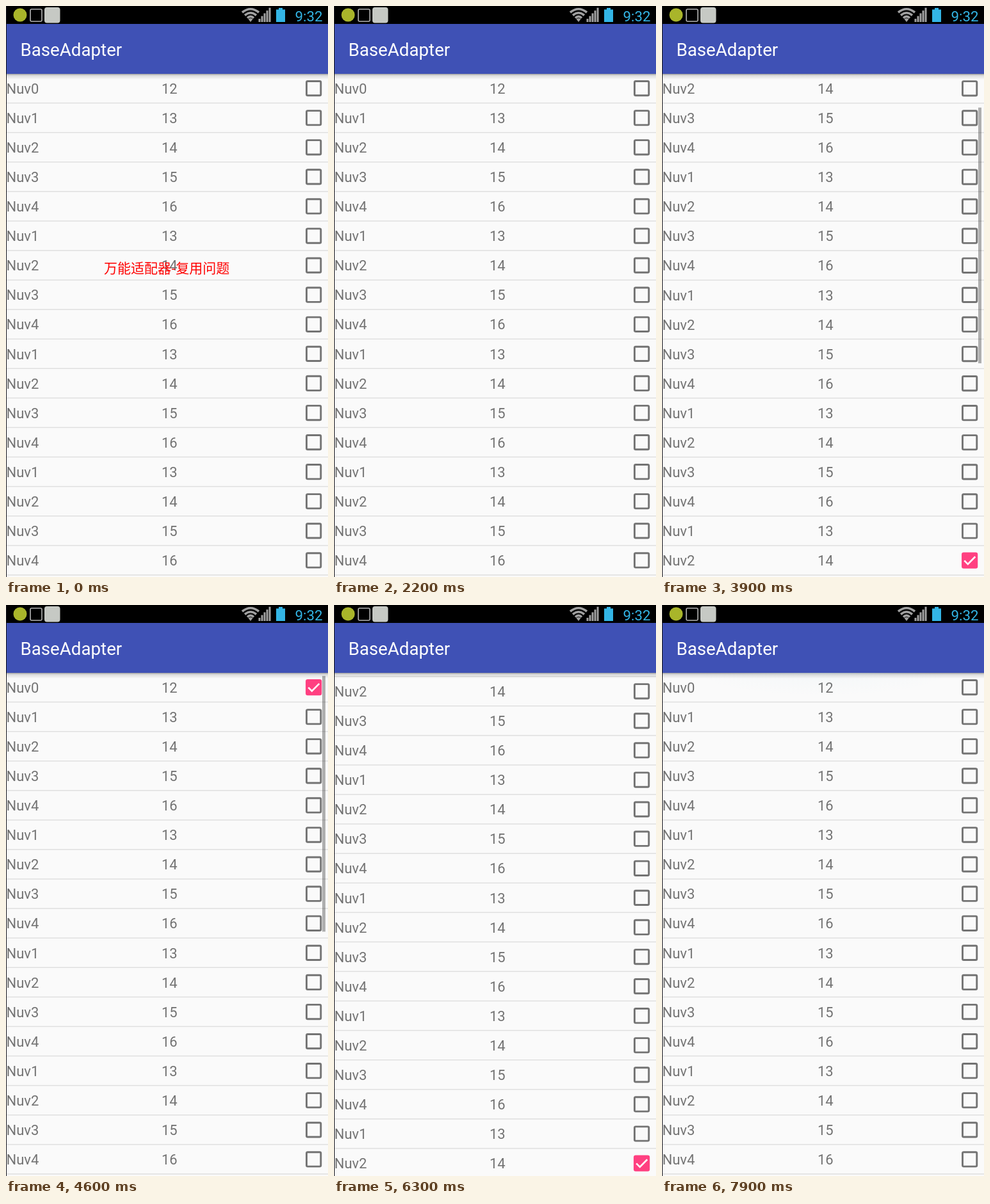
An HTML page for the animation above (8000 ms loop, 503 by 892 pixels).

```html
<!DOCTYPE html>
<html lang="en">
<head>
<meta charset="utf-8">
<title>BaseAdapter</title>
<style>
  html, body { margin: 0; width: 100%; height: 100%; overflow: hidden; background: #fafafa; }
  svg { display: block; width: 503px; height: 892px; }
  text { font-family: Roboto, "Noto Sans", sans-serif; }
  .row text { font-size: 22px; fill: rgba(0, 0, 0, .54); }
  .caption { font: 300 21px "Noto Sans CJK SC", "Noto Sans CJK", sans-serif; fill: #f00; }
</style>
</head>
<body>
<svg viewBox="0 0 503 892">
  <defs>
    <linearGradient id="shade" x2="0" y2="1">
      <stop offset="0" stop-color="#000" stop-opacity=".36"/>
      <stop offset=".3" stop-color="#000" stop-opacity=".12"/>
      <stop offset="1" stop-color="#000" stop-opacity="0"/>
    </linearGradient>
    <radialGradient id="halo">
      <stop offset="0" stop-color="#4fb3d9"/>
      <stop offset="1" stop-color="#4fb3d9" stop-opacity="0"/>
    </radialGradient>
    <radialGradient id="rim">
      <stop offset="0" stop-color="#d8f0f6"/>
      <stop offset="1" stop-color="#d8f0f6" stop-opacity="0"/>
    </radialGradient>
  </defs>
  <rect width="503" height="892" fill="#fafafa"/>
  <g id="list"></g>
  <ellipse id="glow" cx="252" cy="106" rx="200" ry="36" fill="url(#halo)"/>
  <rect id="thumb" x="494" width="5" height="399.5" fill="#000" fill-opacity=".3"/>
  <rect y="106" width="503" height="9" fill="url(#shade)"/>
  <ellipse id="edge" cx="253" cy="106" rx="170" ry="3" fill="url(#rim)"/>

  <rect y="28" width="503" height="78" fill="#3f51b5"/>
  <text x="22.5" y="78" font-size="27.7" fill="#fff">BaseAdapter</text>

  <rect width="503" height="28" fill="#000"/>
  <circle cx="22" cy="14" r="10.5" fill="#a9b52a"/>
  <rect x="38" y="5" width="18" height="19" rx="2" fill="none" stroke="#b4b4b4" stroke-width="1.6"/>
  <rect x="60" y="2" width="24.5" height="24.5" rx="4" fill="#c6c9c4"/>
  <g fill="none" stroke="#a0a0a0" stroke-width="3.6">
    <path d="M369 10Q382 -.5 395 10"/>
    <path d="M373 14.500Q382 7 391 14.500"/>
    <path d="M377 18.700Q382 14 387 18.700"/>
  </g>
  <path d="M378.500 20.500Q382 18 385.500 20.500L382 25Z" fill="#a0a0a0"/>
  <g id="bars" fill="#a0a0a0"></g>
  <path d="M426 3h6v2.500h4V25h-14V5.500h4Z" fill="#33b5e5"/>
  <text x="451.5" y="24" font-size="22.3" fill="#33b5e5">9:32</text>

  <text id="caption" class="caption" x="153" y="417">万能适配器-复用问题</text>
  <rect width="1" height="892" fill="#15151c"/>
</svg>
<script>
const LOOP = 8000, STEP = 100, TOP = 105.5, PITCH = 46.08, COUNT = 33;
const $ = id => document.getElementById(id);
const clamp = x => Math.min(1, Math.max(0, x));
const easeOut = p => 1 - (1 - p) ** 1.35;

// Each drag scrolls over [start, end], then its scrollbar fades over [fade, gone].
const drags = [
  { start: 3600, end: 3900, from: 0, to: 92, fade: 4200, gone: 4200 },
  { start: 4200, end: 4600, from: 92, to: 0, fade: 4800, gone: 5100 },
  { start: 5500, end: 5800, from: 0, to: 86, fade: 6100, gone: 6300 },
  { start: 7000, end: 7200, from: 86, to: 0, fade: 7400, gone: 7600 }
];
const TAPS = [0, 1, 3], TAP_START = 1300, TAP_GAP = 400;
const GLOW_LIFE = 600;

// Progress counted in steps, the first step already moving.
function progress(t, start, end) {
  return clamp((t - start + STEP) / (end - start + STEP));
}

function add(parent, tag, attrs, label) {
  const el = document.createElementNS("http://www.w3.org/2000/svg", tag);
  for (const key in attrs) el.setAttribute(key, attrs[key]);
  if (label !== undefined) el.textContent = label;
  parent.appendChild(el);
  return el;
}

function show(el, on) {
  el.style.display = on ? "" : "none";
}

function makeRow(i) {
  const n = i ? 1 + (i - 1) % 4 : 0;
  const g = add($("list"), "g", { class: "row", transform: `translate(0 ${TOP + i * PITCH})` });
  const press = add(g, "rect", { y: .5, width: 503, height: PITCH - 1, fill: "#84d1ee" });
  add(g, "text", { x: .5, y: 31.3 }, "Nuv" + n);
  add(g, "text", { x: 243, y: 31.3 }, 12 + n);
  const ripple = add(g, "circle", { cx: 480.7, cy: 24.5, r: 21, fill: "#000", "fill-opacity": .1 });
  const box = add(g, "rect", { x: 469.5, y: 12, width: 22.3, height: 22.3, rx: 1.8, "stroke-width": 2.9 });
  const tick = add(g, "path", {
    d: "M472.3 23.4L477.8 29L489.3 17.3", fill: "none", stroke: "#fff", "stroke-width": 2.6
  });
  add(g, "rect", { y: PITCH - .7, width: 503, height: 1.4, fill: "#dedede" });
  return { press, ripple, box, tick };
}

const rows = Array.from({ length: COUNT }, (_, i) => makeRow(i));
for (let i = 0; i < 5; i++) {
  const h = 5 + i * 4.3;
  add($("bars"), "rect", { x: 394.5 + i * 4, y: 25 - h, width: 3, height: h });
}

function scrollState(t) {
  const d = drags.findLast(d => t >= d.start);
  if (!d) return { scroll: 0, thumb: 0, glow: 0 };
  const p = easeOut(progress(t, d.start, d.end));
  return {
    scroll: d.from + (d.to - d.from) * p,
    thumb: t < d.fade ? 1 : 1 - progress(t, d.fade, d.gone),
    glow: d.to === 0 && t >= d.fade ? clamp(1 - (t - d.fade) / GLOW_LIFE) : 0
  };
}

function tappedRow(t) {
  const since = t - TAP_START;
  return since >= 0 && since % TAP_GAP < STEP ? TAPS[Math.floor(since / TAP_GAP)] : -1;
}

// The tick set on row 0 reappears on row 18, which reuses its view.
function isChecked(i, t) {
  return t >= 2800 && (i === 18 || i === 0 && t < 5900);
}

function draw(t) {
  const { scroll, thumb, glow } = scrollState(t), tapped = tappedRow(t);
  const touching = t >= 2800 && t < 2900;
  $("list").setAttribute("transform", `translate(0 ${-scroll})`);
  $("thumb").setAttribute("y", 110.8 + scroll * .52);
  $("thumb").setAttribute("opacity", thumb);
  $("glow").setAttribute("opacity", glow * .2);
  $("edge").setAttribute("opacity", Math.sqrt(glow));
  show($("caption"), t < TAP_START);
  rows.forEach((row, i) => {
    const on = isChecked(i, t);
    show(row.press, i === tapped);
    show(row.ripple, i === 0 && touching);
    show(row.tick, on && !touching);
    row.box.setAttribute("fill", on ? "#ff4081" : "none");
    row.box.setAttribute("stroke", on ? "#ff4081" : "rgba(0,0,0,.54)");
  });
}

const begin = performance.now();
function frame() {
  const t = (performance.now() - begin) % LOOP;
  draw(Math.floor(t / STEP) * STEP);
  requestAnimationFrame(frame);
}
frame();
</script>
</body>
</html>
```
